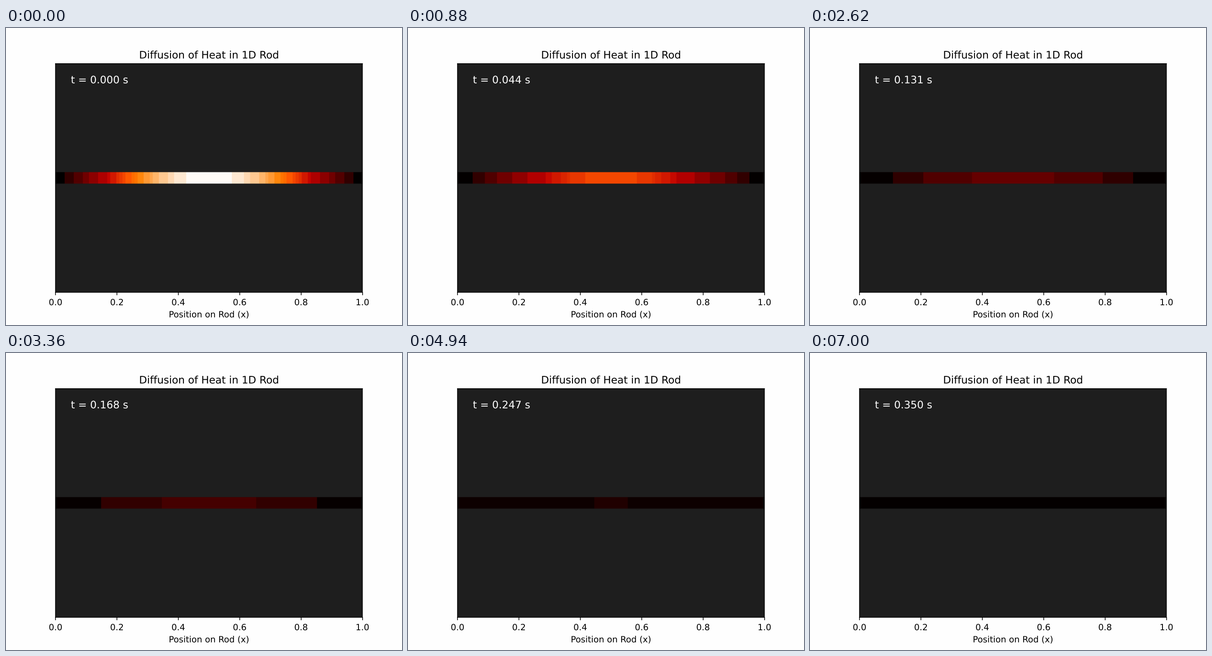
These frames come from a looping animation (864x648 px, 7.02 s). A matplotlib script:

```python
import matplotlib.pyplot as plt
import numpy as np
from matplotlib import patheffects
from matplotlib.animation import FuncAnimation

FRAMES, INTERVAL = 351, 20
DT = 0.001
WHITE, DARK = "#fefefe", "#1e1e1e"
CELL_AREA = 166    # pixels per rod cell
INK_AREA = 6000    # black line work sharing the darkest shade
FINE = 8           # samples per cell, for soft cell edges

x = np.linspace(0, 1, 101)
heat = plt.get_cmap("gist_heat")

# Unsnapped lines and outline text keep fractional pixel positions.
plt.rcParams.update({
    "font.family": "DejaVu Sans",
    "path.snap": False,
    "path.effects": [patheffects.Normal()],
})


def posterize(rgb):
    """Group colours into 3/4/3-bit shades and fill each with its mean."""
    bins = rgb >> np.array([5, 4, 5])
    keys = bins @ np.array([128, 8, 1])
    out = np.empty_like(rgb)
    for key in np.unique(keys):
        cells = keys == key
        area = cells.sum() * CELL_AREA
        total = rgb[cells].sum(axis=0) * CELL_AREA
        out[cells] = total // (area + INK_AREA * (key == 0))
    return np.minimum(out, 254)


def rod_image(t):
    """The rod as the middle half of a band in the background colour."""
    temp = np.sin(np.pi * x) * np.exp(-np.pi ** 2 * t)
    rgb = heat(np.clip(temp, 0, 1), bytes=True)[:, :3].astype(int)
    band = np.full((8 * FINE, len(x) * FINE, 3), 0x1e, dtype=np.uint8)
    band[2 * FINE:6 * FINE] = posterize(rgb).repeat(FINE, axis=0)
    return band


fig, ax = plt.subplots(figsize=(6.4, 4.8), dpi=135, facecolor=WHITE)
ax.set_facecolor(DARK)
rod = ax.imshow(rod_image(0), extent=(0, 1, 0.45, 0.55),
                aspect="auto", interpolation="hanning")
ax.set(xlim=(0, 1), ylim=(0, 1), yticks=[], xticks=np.linspace(0, 1, 6),
       xlabel="Position on Rod (x)", title="Diffusion of Heat in 1D Rod")
clock = ax.text(0.05, 0.95, "", transform=ax.transAxes,
                color=WHITE, fontsize=12, va="top")


def update(i):
    t = i * DT
    rod.set_data(rod_image(t))
    clock.set_text(f"t = {t:.3f} s")
    return rod, clock


anim = FuncAnimation(fig, update, frames=FRAMES, interval=INTERVAL,
                     repeat=True, repeat_delay=0)
plt.show()
```
